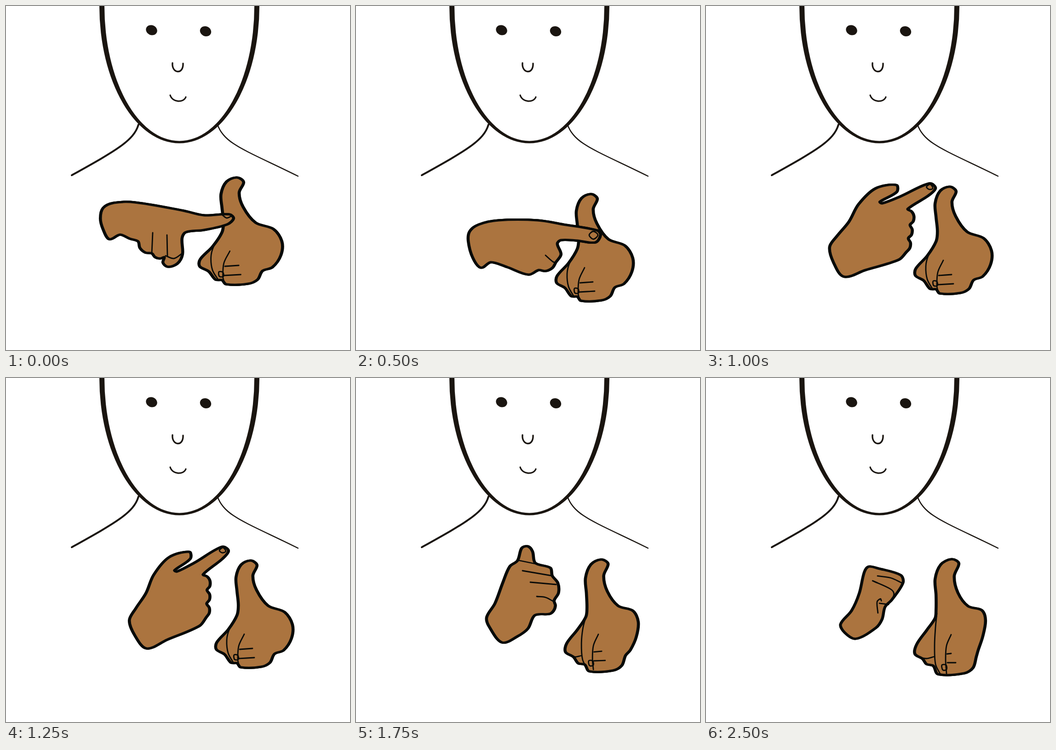
Animation, 748 px wide and 748 px high, one loop 2.75 s. Source, as an HTML page:

```html
<!DOCTYPE html>
<html lang="en">
<head>
<meta charset="utf-8">
<title>Signing hands</title>
<style>
html, body { margin: 0; width: 100%; height: 100%; overflow: hidden; background: #fff; }
svg { display: block; width: 100vw; height: 100vh; }
.face path { fill: none; stroke: #1a1510; stroke-linecap: round; }
.face ellipse, .face .jaw { fill: #1a1510; stroke: none; }
.edge, .skin, .crease { stroke: #080a08; stroke-linejoin: round; vector-effect: non-scaling-stroke; }
.edge { fill: #080a08; stroke-width: 5; }
.skin { fill: #ab743f; stroke-width: 5; }
.crease { fill: none; stroke-width: 2.8; stroke-linecap: round; }
</style>
</head>
<body>
<svg id="stage" viewBox="0 0 748 748"></svg>
<script>
const NS = 'http://www.w3.org/2000/svg';
const LOOP = 2750, STEP = 250;

// Key points: the outline first, then creases.
// "*n" puts n knuckles before the next point; a trailing z closes a crease.
const left = {
  point: [
    '206,462 212,439 235,428 280,427 385,445 430,455 485,453 494,462 480,475 430,487 390,492 382,505 383,540 372,560 352,567 342,558 345,546 *1 318,538 *1 288,512 270,506 248,497 225,507 212,486',
    '319,493 317,538', '350,498 351,543', '347,543 365,549 383,538', '471,455 480,461 490,457'
  ],
  press: [
    '245,512 248,490 268,475 310,466 395,466 450,475 524,488 531,498 520,514 480,510 445,509 437,517 445,540 434,557 *1 397,574 375,584 330,568 293,557 272,569 255,548',
    '412,542 428,556 434,558', '507,498 516,490 526,498 516,507 z'
  ],
  turn: [
    '267,531 272,507 325,446 348,427 378,423 404,432 470,429 510,432 521,445 512,458 445,460 422,466 421,475 *2 424,527 418,540 335,566 304,581 280,560',
    '375,439 415,431', '501,448 510,440 519,447 509,454 z'
  ],
  lift: [
    '269,527 283,501 305,468 322,428 355,390 398,378 400,393 366,418 372,421 410,402 470,367 483,376 470,393 428,427 437,432 *3 435,520 420,539 350,569 306,588 281,560',
    '464,375 472,369 478,377 470,380 z'
  ],
  thumb: [
    '285,520 303,490 320,445 335,410 352,397 361,370 373,366 383,377 389,402 422,413 426,430 *1 430,484 *1 420,513 388,516 373,545 350,562 318,575 290,540',
    '351,396 390,404', '362,419 426,430', '379,444 435,449', '393,475 412,477 428,485'
  ],
  fist: [
    '269,549 298,515 318,472 331,420 342,406 365,410 425,427 431,446 402,488 384,506 376,537 360,558 308,585 280,570',
    '365,429 400,434 428,446', '352,441 398,461 408,473 401,492',
    '366,521 364,493 373,486 375,491', '394,500 370,497'
  ]
};

// The right hand blends between these two poses.
const open = [
  '497,486 494,455 492,425 503,398 523,389 536,399 527,422 535,453 560,487 596,501 613,528 611,558 594,584 574,592 564,611 545,620 502,621 494,612 481,611 467,593 449,582 450,567 475,539 494,508',
  '489,518 476,540 471,562 474,590 486,612', '509,549 497,575 495,605 497,614',
  '499,582 527,580', '497,602 531,600', '487,594 495,595 496,604 488,604 z', '467,593 468,594 469,594'
];
const shut = [
  '502,508 502,475 500,440 512,409 535,397 550,406 540,434 548,470 570,499 600,508 608,530 602,565 592,595 588,609 581,633 562,645 506,647 496,629 481,625 473,614 456,603 460,582 482,551 500,525',
  '503,515 500,545 498,585 500,625 510,646', '534,561 524,585 522,615 524,646',
  '525,603 534,602', '526,622 544,622', '514,627 523,627 524,637 516,638 z', '468,611 480,613 497,609'
];

// [left hand, its transform, how far the right hand is shut, its transform]
const poses = [
  ['point', '', 0, 'translate(-63 -16) scale(1.08 1)'],
  ['point', 'translate(8 15)', 0, 'translate(-38 -6) scale(1.04 1)'],
  ['press', '', 0, 'translate(-12 20)'],
  ['turn', '', 0, ''],
  ['lift', 'translate(-3 0) rotate(6 300 560)', 0, 'translate(7 4)'],
  ['lift', '', 0, 'translate(9 8)'],
  ['lift', 'rotate(-8 300 560)', 0.4, 'translate(3 4)'],
  ['thumb', '', 0.6, 'translate(3 1)'],
  ['fist', 'translate(15 -15)', 0.85, 'translate(2 0)'],
  ['fist', '', 1, ''],
  ['fist', 'translate(70 55) scale(0.83 0.875)', 1, 'translate(-1 -3)']
];

function blend(a, b, k) {
  const to = b.match(/\d+/g);
  let i = 0;
  return a.replace(/\d+/g, v => (+v + (to[i++] - v) * k).toFixed(1));
}

// Row of n bumps from a to b, bulging out of a clockwise outline.
function knuckles([ax, ay], [bx, by], n) {
  const dx = (bx - ax) / n, dy = (by - ay) / n, out = [];
  for (let i = 0; i < n; i++) {
    const x = ax + dx * i, y = ay + dy * i;
    if (i) out.push([x, y]);
    for (const t of [0.3, 0.7]) out.push([x + dx * t + dy * 0.2, y + dy * t - dx * 0.2]);
  }
  return out;
}

function points(text) {
  const list = [];
  let bumps = 0;
  for (const word of text.replace(' z', '').split(' ')) {
    if (word[0] === '*') { bumps = +word.slice(1); continue; }
    const p = word.split(',').map(Number);
    if (bumps) list.push(...knuckles(list[list.length - 1], p, bumps));
    list.push(p);
    bumps = 0;
  }
  return list;
}

// Smooth curve whose handles follow the length of each span.
function curve(text, closed = text.endsWith('z')) {
  const p = points(text), n = p.length;
  const at = i => closed ? p[(i + n) % n] : p[Math.max(0, Math.min(n - 1, i))];
  const handle = (a, b, c, len) => {
    const k = len / 3 / (Math.hypot(b[0] - a[0], b[1] - a[1]) + Math.hypot(c[0] - b[0], c[1] - b[1]));
    return [0, 1].map(j => (b[j] + (c[j] - a[j]) * k).toFixed(2));
  };
  let d = 'M' + p[0];
  for (let i = 0; i < (closed ? n : n - 1); i++) {
    const [a, b, c, e] = [at(i - 1), at(i), at(i + 1), at(i + 2)];
    const len = Math.hypot(c[0] - b[0], c[1] - b[1]);
    d += `C${handle(a, b, c, len)} ${handle(e, c, b, len)} ${c}`;
  }
  return closed ? d + 'Z' : d;
}

function add(parent, tag, attrs) {
  const el = document.createElementNS(NS, tag);
  for (const k in attrs) el.setAttribute(k, attrs[k]);
  return parent.appendChild(el);
}

function drawHand(parent, [outline, ...creases], transform) {
  const g = add(parent, 'g', { transform });
  const d = curve(outline, true);
  // Sideways copies thicken the upright parts of the outline.
  for (const x of [-1.6, 1.6]) add(g, 'path', { d, class: 'edge', transform: `translate(${x} 0)` });
  add(g, 'path', { d, class: 'skin' });
  for (const c of creases) add(g, 'path', { d: curve(c), class: 'crease' });
}

function drawFace(parent) {
  const g = add(parent, 'g', { class: 'face' });
  add(g, 'path', { class: 'jaw', d: 'M203,0A174,298.5 0 0 0 551,0H540A163,293.5 0 0 1 214,0Z' });
  const lines = [
    ['M288,258C278,293 238,315 143,368', 4],
    ['M460,258C474,300 520,313 635,370', 2.4],
    ['M362,124C360,147 386,150 385,125', 3.4],
    ['M357,194C362,210 386,211 391,198', 3.2]
  ];
  for (const [d, w] of lines) add(g, 'path', { d, 'stroke-width': w });
  for (const [cx, cy] of [[316.5, 52.5], [434, 55]])
    add(g, 'ellipse', { cx, cy, rx: 12.5, ry: 10.7, transform: `rotate(25 ${cx} ${cy})` });
}

const stage = document.getElementById('stage');
drawFace(stage);
const groups = poses.map(([name, leftMove, k, rightMove]) => {
  const g = add(stage, 'g', { visibility: 'hidden' });
  drawHand(g, open.map((part, i) => blend(part, shut[i], k)), rightMove);
  drawHand(g, left[name], leftMove);
  return g;
});

let shown = -1;
function update() {
  const i = Math.floor(performance.now() % LOOP / STEP);
  if (i !== shown) {
    groups.forEach((g, k) => g.setAttribute('visibility', k === i ? 'visible' : 'hidden'));
    shown = i;
  }
  requestAnimationFrame(update);
}
update();
</script>
</body>
</html>
```
